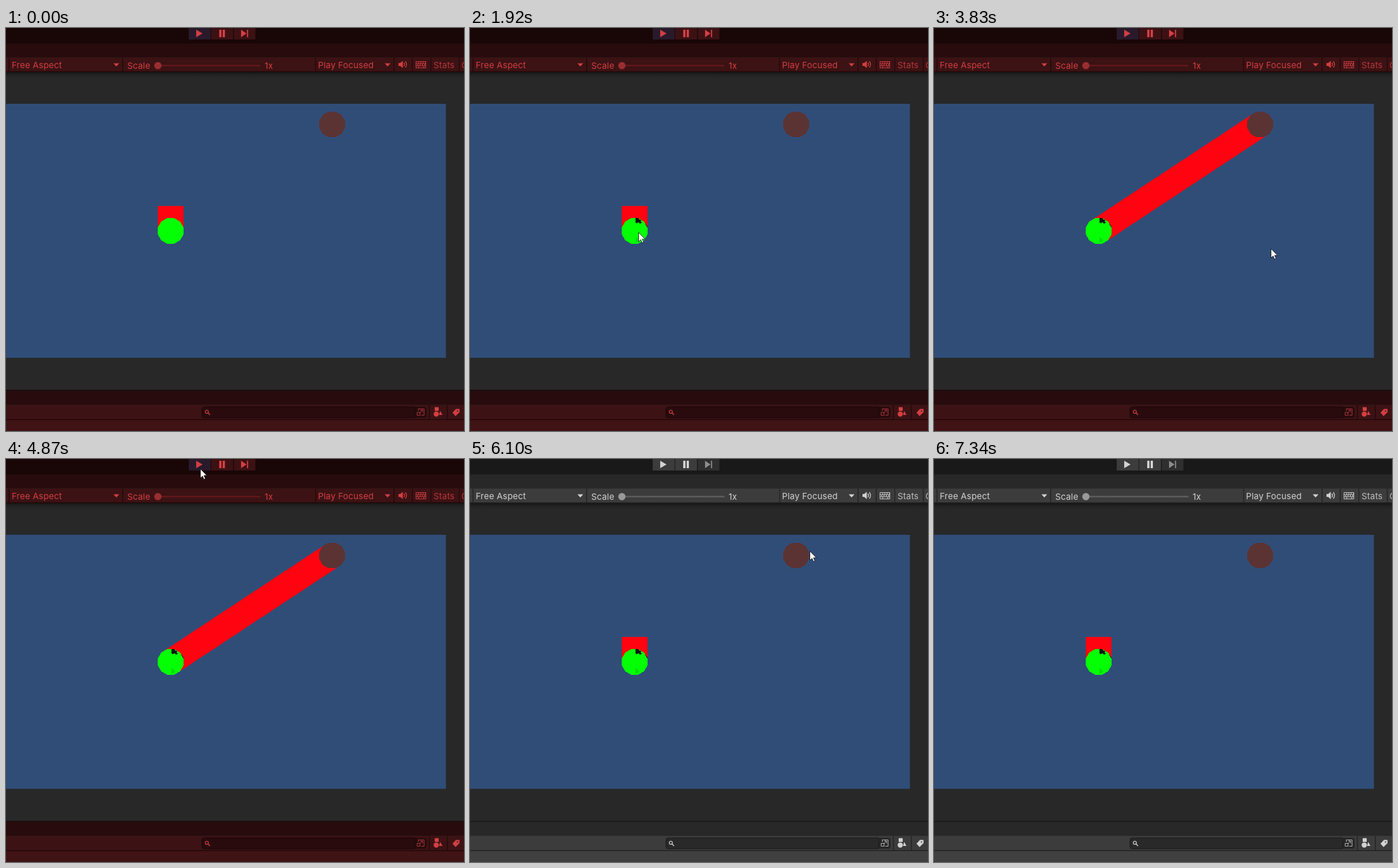
Animation of 797 by 702 pixels, one loop 8 s. Source, as an HTML page:

```html
<!DOCTYPE html>
<html lang="en">
<head>
<meta charset="utf-8">
<title>Stretching arm</title>
<style>
  html, body { margin: 0; width: 100%; height: 100%; overflow: hidden; background: #282828; }
  svg { display: block; width: 797px; height: 702px; font: 15px Inter, sans-serif; letter-spacing: .2px; }
  .plain { --top: #191919; --tab: #282828; --bar: #3c3c3c; --low: #404040; --line: #202020; --edge: #181818;
    --field: #292929; --ink: #d2d2d2; --dim: #bebebe; --track: #5e5e5e; --knob: #999; --btn: #3c3c3c;
    --idle: #2f2f2f; --off: #8c8c8c; }
  .tint { --top: #190607; --tab: #280c0d; --bar: #3c1214; --low: #401315; --line: #200809; --edge: #180506;
    --field: #290b0d; --ink: #d23f43; --dim: #b5363a; --track: #64191c; --knob: #992e31; --btn: #3c1114;
    --idle: #3c1114; --off: #d23f43; }
  .top { fill: var(--top); } .tab { fill: var(--tab); } .bar { fill: var(--bar); } .low { fill: var(--low); }
  .line { fill: var(--line); } .edge { fill: var(--edge); } .btn { fill: var(--btn); } .idle { fill: var(--idle); }
  .ink, text { fill: var(--ink); } .dim { fill: var(--dim); } .off { fill: var(--off); }
  .stroke { fill: none; stroke: var(--ink); }
  #arm, polygon { shape-rendering: crispEdges; }
</style>
</head>
<body>
<svg id="stage" class="tint" viewBox="0 0 797 702">
  <defs>
    <linearGradient id="shade" x2="0" y2="1">
      <stop offset="0" stop-color="#111" stop-opacity=".85"/>
      <stop offset=".4" stop-color="#181818" stop-opacity=".4"/>
      <stop offset="1" stop-color="#282828" stop-opacity="0"/>
    </linearGradient>
  </defs>

  <!-- Game view -->
  <rect width="797" height="702" fill="#282828"/>
  <rect y="76" width="797" height="15" fill="url(#shade)"/>
  <rect y="132" width="765.5" height="442.5" fill="#304d78"/>
  <rect id="arm" y="-22.5" height="45" fill="#ff0410"/>
  <polygon id="hub" fill="#04ff04"/>
  <polygon id="goal" fill="#5b3333"/>
  <g id="smudge">
    <path d="M288 331h5l2 3h3l-1 3 2 2-3 2-3-3-2 2-3-1z" fill="#06180c"/>
    <path d="M305.500 341.500l3.500 5.500" stroke="#102010" stroke-width="1.200"/>
    <path d="M288 364l7 6-2 2-5 2z" fill="#00df08"/>
  </g>

  <!-- Top bars -->
  <rect class="top" width="797" height="27"/>
  <rect class="tab" y="27" width="797" height="24.500"/>
  <rect class="bar" y="51.500" width="797" height="24.500"/>
  <rect class="line" y="75.500" width="797" height="1.500"/>
  <g id="seps"></g>

  <rect id="playBtn" x="318" width="38" height="20"/>
  <path class="ink" d="M331 3l11 6.500-11 6.500z"/>
  <g id="pair">
    <path class="btn" d="M357 0h38v20h-38z"/>
    <path class="idle" d="M396.500 0h37.500v20h-37.500z"/>
    <path class="ink" d="M371 3h4v13h-4zM377 3h4v13h-4z"/>
    <path class="off" d="M409 3l9.500 6.500-9.500 6.500zM419.300 3h2v13h-2z"/>
  </g>

  <text x="10" y="70">Free Aspect</text>
  <path class="ink" d="M187 61.500h10l-5 5.500zM659 61.500h10l-5 5.500z"/>
  <text x="211" y="71">Scale</text>
  <rect x="264" y="64.300" width="179" height="2.400" rx="1" style="fill:var(--track)"/>
  <circle cx="264.300" cy="65.500" r="6.300" style="fill:var(--knob)"/>
  <text x="450" y="71">1x</text>
  <text x="543" y="70">Play Focused</text>
  <text class="dim" x="744" y="70">Stats</text>
  <text class="dim" x="792.500" y="70">Gizmos</text>
  <path class="ink" d="M683 61h3l4.500-4v13l-4.500-4h-3z"/>
  <path class="stroke" stroke-width="1.500" d="M692.500 60.500q2 3 0 6M695 58q4 5.500 0 11"/>
  <path class="stroke" d="M713.500 58.500h17v11h-17zM713.500 62.200h17M713.500 65.800h17"/>
  <path class="stroke" stroke-width="3.600" stroke-dasharray="1 3" d="M717.500 60.300h13M716 64h14"/>
  <path class="stroke" stroke-width="3.600" stroke-dasharray="1 8" d="M717.500 67.600h11"/>

  <!-- Bottom bars -->
  <rect class="edge" y="630.500" width="797" height="2"/>
  <rect class="tab" y="632.500" width="797" height="24"/>
  <rect class="bar" y="656.500" width="797" height="25.500"/>
  <rect class="line" y="681.500" width="797" height="1.500"/>
  <rect class="low" y="683" width="797" height="19"/>
  <rect x="341" y="660" width="391" height="19" rx="4" style="fill:var(--tab)"/>
  <path d="M711 660h-366q-4 0-4 4v11q0 4 4 4h366z" style="fill:var(--field);stroke:var(--edge)"/>
  <circle class="stroke" cx="349.500" cy="668.500" r="2.700" stroke-width="1.300"/>
  <path class="stroke" stroke-width="1.600" d="M351.500 670.500l3.500 3.500"/>
  <path class="stroke" style="stroke:var(--dim)" d="M717.500 667v-3.500h10v11h-5M715.500 669.500h5v5h-5zM719.500 671l5-5M721 665.500h4v4"/>
  <path class="ink" d="M746 660.500h7v6.500h-7zM755.500 667l4 7h-6z"/>
  <circle class="ink" cx="748.700" cy="672.500" r="4.500"/>
  <path class="ink" fill-rule="evenodd" d="M777 670l6-6.500h5.500l.8.800v4.700l-7 7zM785.700 666a1.100 1.100 0 1 0 .1 0z"/>

  <path id="cursor" d="M.5.500v16l3.700-3.400 2.500 5.600 2.500-1.100-2.500-5.500h5z" fill="#fff" stroke="#111" stroke-width=".9"/>
</svg>
<script>
const $ = id => document.getElementById(id);
const LOOP = 8000;
const HUB = [286.5, 353.5], GOAL = [567.5, 168];
const REST = 43.5, LAUNCH = 24.5;
const dx = GOAL[0] - HUB[0], dy = GOAL[1] - HUB[1];
const reach = Math.hypot(dx, dy);
const aim = Math.atan2(dy, dx) * 180 / Math.PI;

const glide = p => p * p * (3 - 2 * p);
const settle = p => 1 - (1 - p) ** 3;

// Each pointer move bends toward `via` and starts where the last one ended
const entry = [578, 598];
const moves = [
  { start: 320, end: 1020, count: 11, via: [156, 380], to: [340, 124] },
  { start: 1290, end: 2060, count: 12, via: [400, -110], to: [292, 360], ease: settle },
  { start: 2190, end: 2190, count: 1, to: [271, 350] },
  { start: 2340, end: 2680, count: 6, to: [595, 393] },
  { start: 3830, end: 4590, count: 11, via: [400, 200], to: [336, 21] },
  { start: 4660, end: 5080, count: 7, to: [339, 14] },
  { start: 5350, end: 6100, count: 11, via: [440, 10], to: [591, 160] },
  { start: 6170, end: 6650, count: 8, via: [615, 190], to: [587, 177] },
  { start: 6920, end: 7340, count: 7, via: [450, 130], to: [-14, 133] },
];

// Progress in even jumps; the first jump happens at `start`
function stepped(t, { start, end, count }) {
  if (t < start) return 0;
  const gap = (end - start) / (count - 1) || 1;
  return Math.min(1, (Math.floor((t - start) / gap + 1e-6) + 1) / count);
}

function pointer(t) {
  let at = entry;
  for (const move of moves) {
    const s = (move.ease || glide)(stepped(t, move));
    at = at.map((a, k) => {
      const b = move.to[k], c = move.via ? move.via[k] : (a + b) / 2;
      return a * (1 - s) ** 2 + 2 * c * s * (1 - s) + b * s * s;
    });
  }
  return at;
}

function dodecagon(id, [x, y]) {
  const r = 22.4 / Math.cos(Math.PI / 12);
  $(id).setAttribute('points', Array.from({ length: 12 }, (_, i) => {
    const a = (i + .5) * Math.PI / 6;
    return `${x + r * Math.cos(a)},${y + r * Math.sin(a)}`;
  }).join(' '));
}

function draw(t) {
  const playing = t < 5080, running = t < 5150;
  const fired = t >= 3080 && running;
  $('stage').setAttribute('class', playing ? 'tint' : 'plain');
  $('pair').setAttribute('class', running ? 'tint' : 'plain');
  $('playBtn').setAttribute('fill', playing ? '#291a2b' : running ? '#505050' : '#3c3c3c');

  const shot = stepped(t, { start: 3080, end: 3430, count: 6 });
  $('arm').setAttribute('width', fired ? LAUNCH + (reach - LAUNCH) * shot : REST);
  $('arm').setAttribute('transform', `translate(${HUB}) rotate(${fired ? aim : -90})`);
  $('smudge').setAttribute('visibility', t < 740 ? 'hidden' : 'visible');

  $('cursor').setAttribute('visibility', t < moves[0].start ? 'hidden' : 'visible');
  $('cursor').setAttribute('transform', `translate(${pointer(t)})`);
}

dodecagon('hub', HUB);
dodecagon('goal', GOAL);
const seps = (xs, y, h) => xs.map(x => `<rect class="line" x="${x}" y="${y}" width="1.3" height="${h}"/>`).join('');
$('seps').innerHTML = seps([4.7, 202.3, 538.3, 674.7, 706.3, 738.7, 788], 51.5, 24.5);
$('cursor').insertAdjacentHTML('beforebegin', seps([736, 767.5], 656.5, 25.5));

function tick() {
  draw(performance.now() % LOOP);
  requestAnimationFrame(tick);
}
tick();
</script>
</body>
</html>
```
